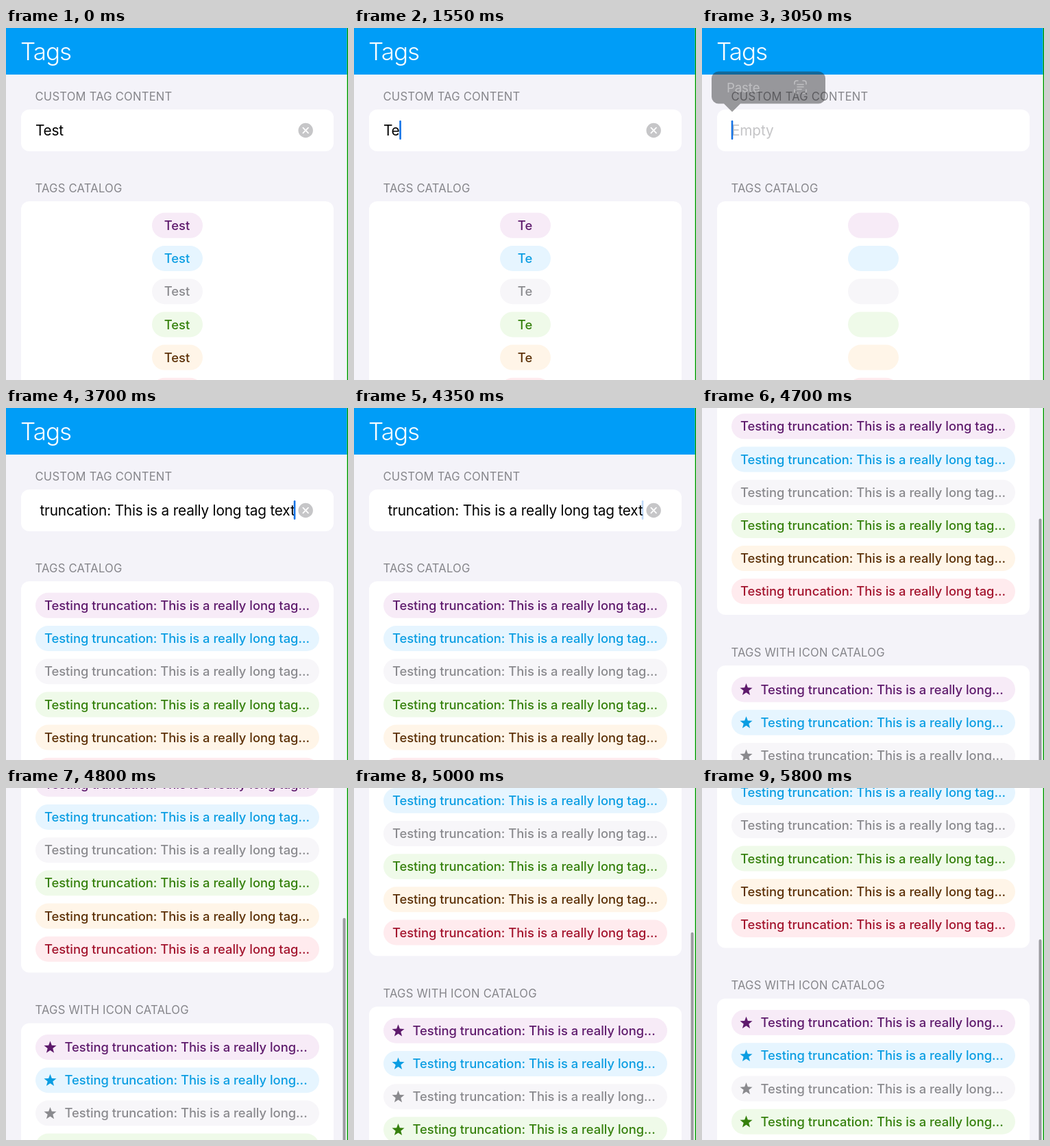
An HTML page for the animation above (5940 ms loop, 499 by 514 pixels).

```html
<!DOCTYPE html>
<html lang="en">
<head>
<meta charset="utf-8">
<title>Tags</title>
<style>
  html, body { margin: 0; width: 100%; height: 100%; overflow: hidden; background: #f4f3f9; }
  svg { display: block; width: 499px; height: 514px; }
  text { font-family: Inter, "Open Sans", sans-serif; white-space: pre; }
  .title { font-size: 35px; font-weight: 300; letter-spacing: -1px; fill: #fff; }
  .head { font-size: 16.6px; letter-spacing: .22px; fill: #85858a; }
  .field { font-size: 20.8px; letter-spacing: -.19px; }
  .tag { font-size: 18.4px; font-weight: 500; letter-spacing: -.02px; }
  .menu { font-size: 18.6px; letter-spacing: -.1px; fill: #fff; }
</style>
</head>
<body>
<svg id="stage" viewBox="0 0 499 514">
  <rect width="499" height="514" fill="#f4f3f9"/>
  <g id="page">
    <rect width="499" height="68" fill="#009df7"/>
    <text class="title" x="21" y="47">Tags</text>
    <text class="head" x="42.5" y="105.5">CUSTOM TAG CONTENT</text>
    <text class="head" x="42.5" y="240">TAGS CATALOG</text>
    <text class="head" x="42.5" y="624">TAGS WITH ICON CATALOG</text>
    <g fill="#fff">
      <rect x="22" y="119" width="456" height="61" rx="12"/>
      <rect x="22" y="253" width="456" height="310.5" rx="12"/>
      <rect x="22" y="637.5" width="456" height="310.5" rx="12"/>
    </g>
    <text id="field" class="field" y="157"></text>
    <rect id="caret" y="135" width="2.6" height="28" rx="1.2" fill="#1473e6"/>
    <g id="clear">
      <circle cx="437.2" cy="149.5" r="10.7" fill="#c6c6c8"/>
      <path d="M433.4 145.7l7.6 7.6m0-7.6l-7.6 7.6" stroke="#fff" stroke-width="1.8" stroke-linecap="round"/>
    </g>
    <g id="tags"></g>
    <g id="menu">
      <path id="menuBox" fill="#28282a" d="M24 63.5H170a10 10 0 0 1 10 10V100.5a10 10 0 0 1 -10 10H56L44 122.5 32 110.5H24a10 10 0 0 1 -10 -10V73.5a10 10 0 0 1 10 -10Z"/>
      <g id="menuInk">
        <text class="menu" x="36" y="93.5">Paste</text>
        <path fill="none" stroke="#fff" stroke-width="1.6" stroke-linecap="round"
          d="M135 82v-2a3 3 0 0 1 3-3h2M147 77h2a3 3 0 0 1 3 3v2M152 90v2a3 3 0 0 1-3 3h-2M140 95h-2a3 3 0 0 1-3-3v-2M139 82.5h9M139 86h9M139 89.5h6"/>
      </g>
    </g>
  </g>
  <rect id="bar" x="491.5" width="4" height="600" rx="2" fill="#9c9ca1"/>
  <rect x="497" width="1" height="514" fill="#3cf03c" opacity=".5"/>
  <rect x="498" width="1" height="514" fill="#008700"/>
</svg>
<script>
const LOOP = 5940, NS = "http://www.w3.org/2000/svg";
const $ = id => document.getElementById(id);
const clamp = (v, a = 0, b = 1) => Math.min(b, Math.max(a, v));

// [ink, fill] of each tag style
const STYLES = [
  ["#5e1a6c", "#f7ebf7"], ["#0a9de2", "#e6f5ff"], ["#8a8a8e", "#f7f6f9"],
  ["#35800c", "#effae9"], ["#5c3006", "#fff5e8"], ["#a3142d", "#ffebee"]
];
const PITCH = 48.2, PASTE = 3400;
const LONG = "Testing truncation: This is a really long";

function add(parent, name, attrs) {
  const el = document.createElementNS(NS, name);
  for (const k in attrs) el.setAttribute(k, attrs[k]);
  return parent.appendChild(el);
}

function star(cx, cy, r) {
  const pts = [];
  for (let i = 0; i < 10; i++) {
    const a = i * Math.PI / 5 - Math.PI / 2, d = i % 2 ? r * 0.42 : r;
    pts.push((cx + d * Math.cos(a)).toFixed(2) + "," + (cy + d * Math.sin(a)).toFixed(2));
  }
  return pts.join(" ");
}

const tags = STYLES.map(([ink, fill], i) => {
  const y = 288.3 + i * PITCH, iconY = 672.5 + i * PITCH;
  const pill = add($("tags"), "rect", { y: y - 18.5, height: 37, rx: 18.5, fill });
  const label = add($("tags"), "text", { class: "tag", x: 249.5, y: y + 6.6, "text-anchor": "middle", fill: ink });

  add($("tags"), "rect", { x: 43, y: iconY - 18.5, width: 414, height: 37, rx: 18.5, fill });
  add($("tags"), "polygon", { points: star(64.5, iconY + 0.6, 9.5), fill: ink });
  add($("tags"), "text", { class: "tag", x: 85.5, y: iconY + 6.6, fill: ink }).textContent = LONG + "...";
  return { pill, label };
});

function typed(t) {
  if (t >= PASTE) return LONG + " tag text";
  const cuts = [700, 1300, 1800, 2300].filter(at => t >= at).length;
  return "Test".slice(0, 4 - cuts);
}

let shown = null;
function setText(text) {
  if (text === shown) return;
  shown = text;
  const long = text.length > 4, field = $("field");
  field.textContent = long ? text.slice(8) : text || "Empty";
  field.setAttribute("fill", text ? "#000" : "#c5c5c7");
  field.setAttribute("x", long ? 49.5 : 43);
  $("clear").style.display = text ? "" : "none";
  $("caret").setAttribute("x", long ? 419.8 : text ? 42.7 + field.getComputedTextLength() : 42.7);
  for (const { pill, label } of tags) {
    pill.setAttribute("x", long ? 43 : 213);
    pill.setAttribute("width", long ? 414 : 74);
    label.textContent = long ? LONG + " tag..." : text;
  }
}

function caretAlpha(t) {
  return t < 250 ? 0 : clamp(1 - (t - 4300) / 70);
}

function menuAlpha(t) {
  if (t < 2700) return 0;
  if (t < 3050) return 0.1;
  if (t < PASTE) return clamp(0.45 + (t - 3050) / 100 * 0.55);
  return clamp(1 - (t - PASTE) / 200);
}

// finger drag, then a decaying glide
function scrollAt(t) {
  if (t < 4550) return 130.5 * clamp((t - 4375) / 175) ** 1.7;
  const d = t - 4550;
  return 330.5 - 162 * Math.exp(-d / 120) - 38 * Math.exp(-d / 300);
}

function draw(t) {
  setText(typed(t));
  $("caret").setAttribute("opacity", caretAlpha(t));

  const m = menuAlpha(t);
  $("menuBox").setAttribute("opacity", m);
  $("menuInk").setAttribute("opacity", m * 0.85);

  const s = scrollAt(t);
  $("page").setAttribute("transform", `translate(0 ${-s.toFixed(2)})`);
  $("bar").setAttribute("y", (47.5 + (s - 130.5) * 0.87).toFixed(2));
  $("bar").setAttribute("opacity", clamp((t - 4380) / 100));
}

const start = performance.now();
function tick(now) {
  draw(Math.max(0, now - start) % LOOP);
  requestAnimationFrame(tick);
}
draw(0);
requestAnimationFrame(tick);
</script>
</body>
</html>
```
